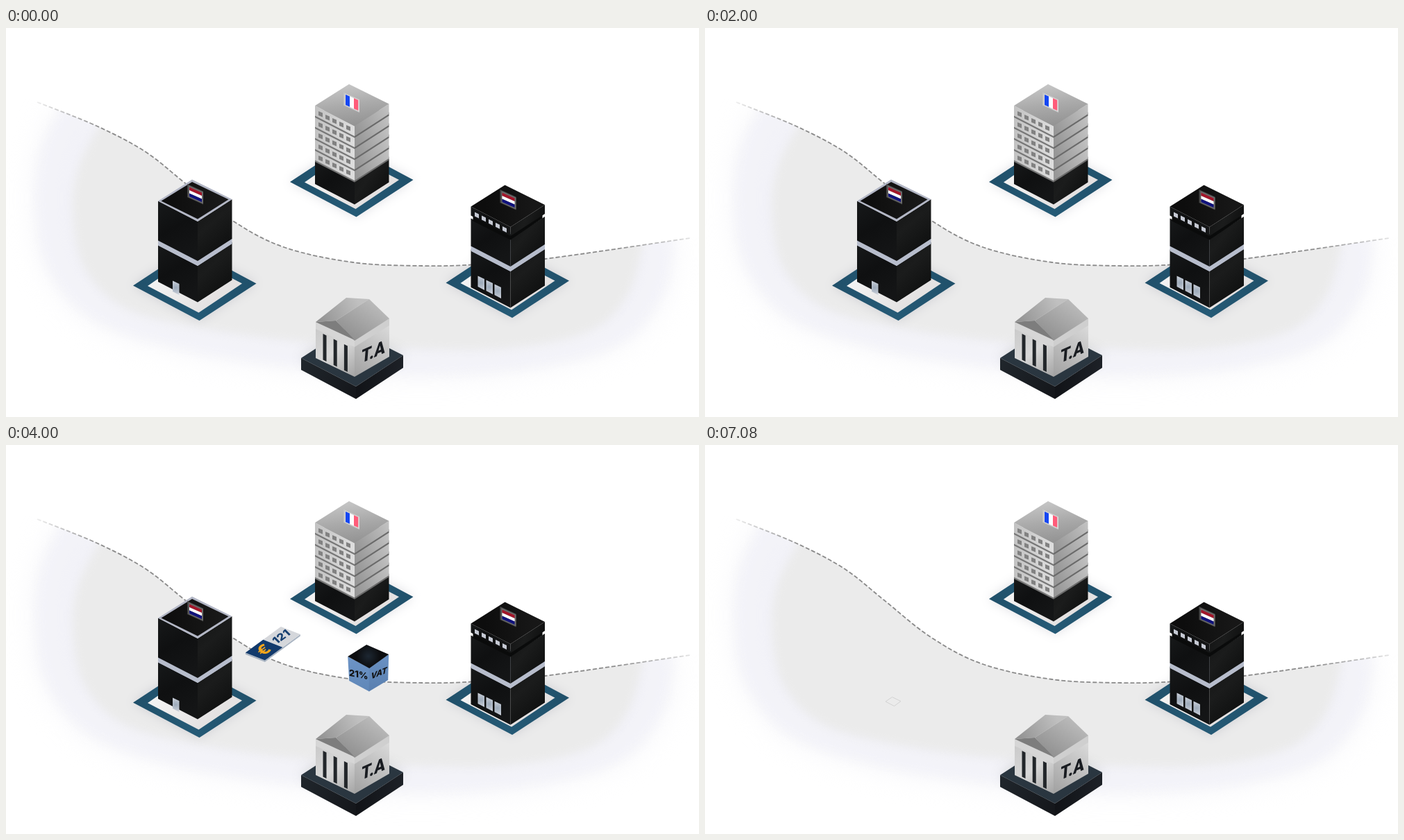
Write an HTML page with a canvas that moves like this. It is 998 px wide and 561 px high and loops after 8000 ms.

```html
<!DOCTYPE html>
<html lang="en">
<head>
<meta charset="utf-8">
<title>VAT chain transaction</title>
<style>
html, body { margin: 0; width: 100%; height: 100%; overflow: hidden; background: #fff; }
canvas { display: block; width: 998px; height: 561px; }
</style>
</head>
<body>
<canvas id="stage" width="998" height="561"></canvas>
<script>
const LOOP = 8000, W = 998, H = 561;
const stage = document.getElementById('stage').getContext('2d');
let g = stage;

const clamp = v => Math.min(1, Math.max(0, v));
const ease = v => (1 - Math.cos(Math.PI * clamp(v))) / 2;

function poly(fill, ...p) {
  g.beginPath();
  for (let i = 0; i < p.length; i += 2) g.lineTo(p[i], p[i + 1]);
  g.closePath();
  g.fillStyle = fill;
  g.fill();
}

function grad(x0, y0, x1, y1, ...colors) {
  const r = g.createLinearGradient(x0, y0, x1, y1);
  colors.forEach((c, i) => r.addColorStop(i / (colors.length - 1), c));
  return r;
}

function glow(x, y, radius, inner, outer) {
  const r = g.createRadialGradient(x, y, 0, x, y, radius);
  r.addColorStop(0, inner);
  r.addColorStop(1, outer);
  return r;
}

function at(x, y, draw, scale = 1, alpha = 1) {
  g.save();
  g.translate(x, y);
  g.scale(scale, scale);
  g.globalAlpha *= alpha;
  draw();
  g.restore();
}

function label(text, x, y, size, color, a, b, c, d) {
  g.save();
  g.transform(a, b, c, d, x, y);
  g.font = `800 ${size}px Inter, Arial, sans-serif`;
  g.textAlign = 'center';
  g.textBaseline = 'middle';
  g.fillStyle = color;
  g.fillText(text, 0, 0);
  g.restore();
}

// Smooth curve through points
function spline(pts) {
  g.moveTo(...pts[0]);
  for (let i = 0; i < pts.length - 1; i++) {
    const a = pts[Math.max(0, i - 1)], b = pts[i], c = pts[i + 1];
    const d = pts[Math.min(pts.length - 1, i + 2)];
    g.bezierCurveTo(b[0] + (c[0] - a[0]) / 6, b[1] + (c[1] - a[1]) / 6,
      c[0] - (d[0] - b[0]) / 6, c[1] - (d[1] - b[1]) / 6, c[0], c[1]);
  }
}

const border = [[45, 107], [130, 141], [200, 178], [257, 223], [325, 277], [400, 316],
  [500, 338], [600, 343], [680, 341], [776, 333], [985, 303]];
const land = [[140, 130], [103, 205], [97, 280], [115, 350], [170, 403], [270, 431],
  [420, 452], [570, 462], [720, 462], [840, 437], [895, 385], [918, 310]];
const rim = [[85, 105], [50, 180], [44, 270], [62, 350], [125, 420], [250, 462],
  [410, 488], [570, 500], [740, 492], [880, 457], [945, 385], [962, 300]];

function softArea(pts, color, blur) {
  g.filter = `blur(${blur}px)`;
  g.fillStyle = color;
  g.beginPath();
  spline(pts);
  g.lineTo(600, 200);
  g.closePath();
  g.fill();
  g.filter = 'none';
}

function ground() {
  g.save();
  g.beginPath();
  spline(border);
  g.lineTo(W, 301);
  g.lineTo(W, H);
  g.lineTo(0, H);
  g.lineTo(0, 89);
  g.closePath();
  g.clip();
  softArea(rim, '#f4f4f8', 20);
  softArea(rim, 'rgba(240,240,247,.55)', 7);
  softArea(land, '#ebebeb', 6);
  g.restore();

  g.beginPath();
  spline(border);
  g.setLineDash([6, 3]);
  g.lineWidth = 1.8;
  const line = g.createLinearGradient(45, 0, 985, 0);
  [[0, .15], [.1, 1], [.88, 1], [1, .25]].forEach(([p, a]) => line.addColorStop(p, `rgba(138,138,138,${a})`));
  g.strokeStyle = line;
  g.stroke();
  g.setLineDash([]);
}

// Plate and block coordinates are relative to the left roof corner of a tower
function plate() {
  g.save();
  g.shadowColor = 'rgba(110,110,130,.22)';
  g.shadowBlur = 16;
  poly(grad(-36, 109, 142, 109, '#20506a', '#255a76', '#20506a'), -36, 110, 59.5, 160.5, 141.5, 107, 46, 56);
  g.restore();
  poly(grad(0, 90, 60, 150, '#f4f4f4', '#e4e2e2'), -15, 110.5, 58.5, 149, 121, 107, 46, 68);
}

function block(y, h, left, right) {
  poly(left, 0, y, 57, y + 29.5, 57, y + 29.5 + h, 0, y + h);
  poly(right, 57, y + 29.5, 106.5, y - 2.5, 106.5, y - 2.5 + h, 57, y + 29.5 + h);
}

const roof = (fill, y = 0) => poly(fill, 0, y, 49, y - 31, 106.5, y - 2.5, 57, y + 29.5);

function darkBlock(y, h) {
  block(y, h, grad(0, y, 45, y + h + 20, '#17191a', '#0f1011', '#141516'),
    grad(57, y, 106, y + h, '#131414', '#1b1c1c', '#101111'));
}

function flag(x, y, frame, stripes, vertical) {
  g.save();
  g.transform(1, .45, 0, 1, x, y);
  g.fillStyle = frame;
  g.fillRect(-1, -1, 23, 19);
  g.fillStyle = vertical ? '#d9d9d9' : '#6a6a6a';
  g.fillRect(1, 0, 21, 17);
  stripes.forEach((c, i) => {
    g.fillStyle = c;
    if (vertical) g.fillRect(2 + i * 6, 1, 6.2, 15);
    else g.fillRect(2, 2 + i * 4.5, 18, 4.6);
  });
  g.restore();
}

const dutch = (x, y) => flag(x, y, '#464646', ['#a3162a', '#fff', '#10127c']);

function door(x, y, h = 16) {
  poly(glow(x + 4.5, y + h / 2 + 2, 11, '#9aa8b8', '#cfd3dc'), x, y, x + 9.5, y + 4.5, x + 9.5, y + 4.5 + h, x, y + h - .5);
}

function lowerFloors() {
  darkBlock(62, 54.5);
  roof('#b7bdcc', 64);
  block(56, 8, '#b7bdcc', '#b7bdcc');
}

function rimTower() {
  lowerFloors();
  darkBlock(0, 57);
  roof('#b2b6c5');
  poly(grad(20, 0, 90, 0, '#0e0e0e', '#191919'), 4.5, 0, 49, -27.5, 101.5, -2.2, 57, 26);
  dutch(43, -23);
  door(21, 115);
}

function windowTower() {
  lowerFloors();
  darkBlock(17, 40);
  poly('#0a0b0b', 3, 13, 57, 40, 103, 10, 103, 17, 57, 48, 3, 21);
  darkBlock(0, 13);
  roof(grad(20, 0, 90, 0, '#0d0d0d', '#171717'));
  for (let i = 0; i < 5; i++) {
    const x = 5.5 + i * 10, y = 8 + i * 5.1;
    poly('#c5c9d3', x, y, x + 6, y + 3, x + 6, y + 9, x, y + 6);
  }
  dutch(43, -23);
  for (let i = 0; i < 3; i++) door(10 + i * 12, 100 + i * 6);
}

function greyTower() {
  darkBlock(80, 33);
  roof('#101112', 80);
  for (let i = 4; i >= 0; i--) {
    const y = i * 16;
    block(y + 12, 5, '#777', '#6a6a6a');
    block(y, 14.5, grad(0, 0, 57, 0, '#c2c2c2', '#dedede'), grad(57, y + 30, 106, y, '#979797', '#c2c2c2'));
    roof(grad(57, y + 29, 49, y - 31, '#939393', '#aaa', '#c6c6c6'), y);
    for (let k = 0; k < 5; k++) {
      const x = 5 + k * 10, wy = y + 8 + k * 5;
      poly('#818181', x, wy, x + 6, wy + 2.5, x + 6, wy + 8.5, x, wy + 6);
    }
  }
  flag(42, -18, '#c4c4c4', ['#1647f2', '#fff', '#ff5c7a'], true);
}

function temple() {
  g.save();
  g.shadowColor = 'rgba(110,120,110,.25)';
  g.shadowBlur = 18;
  poly('#2a3640', 425, 476, 493, 432, 572, 472, 504, 517);
  g.restore();
  poly(grad(425, 480, 504, 535, '#20262c', '#14161a'), 425, 476, 504, 517, 504, 535, 425, 493);
  poly(grad(504, 0, 572, 0, '#111317', '#1d2127'), 504, 517, 572, 472, 572, 490, 504, 535);
  poly(grad(446, 430, 502, 503, '#c9c9c9', '#d8d8d8', '#a4a4a4'), 446, 424, 502, 449, 502, 503, 446, 476);
  poly(grad(502, 500, 552, 430, '#a2a2a2', '#dadada'), 502, 449, 552, 419, 552, 474, 502, 503);
  for (let i = 0; i < 3; i++) {
    const x = 456.5 + i * 15.2, y = 441 + i * 7.5;
    poly('#22262a', x, y, x + 5, y + 2.5, x + 5, y + 40, x, y + 37.5);
  }
  poly('#d6d6d6', 446, 424, 502, 449, 502, 460, 446, 434);
  poly('#cfcfcf', 502, 449, 552, 419, 552, 429, 502, 460);
  poly(grad(446, 424, 505, 390, '#8f8f8f', '#c0c0c0'), 446, 424, 490, 389, 523, 391, 475, 422);
  poly(grad(490, 445, 525, 391, '#909090', '#bbb'), 475, 422, 523, 391, 552, 419, 502, 451);
  poly('#7d7d7d', 446, 424, 475, 422, 502, 450);
  g.save();
  g.transform(.85, -.38, -.08, 1, 529, 468);
  g.font = '900 27px Roboto, Arial, sans-serif';
  g.textAlign = 'center';
  g.textBaseline = 'middle';
  g.fillStyle = '#191c21';
  g.fillText('T.A', 0, 0);
  g.restore();
}

function cube(rate) {
  poly(grad(0, -15, 0, 30, '#6d94c6', '#6088b9'), -29.5, -16.5, 1.5, 0, 1.5, 34, -27.5, 18.5);
  poly(grad(0, -15, 0, 30, '#6a91c3', '#5a80b0'), 1, 0, 29.5, -19.5, 28.5, 17.5, 1, 34);
  poly(glow(0, -17, 17, '#1d2732', '#0c0d0f'), -29.5, -16.5, -2.5, -33.5, 29.5, -19.5, 1.5, .5);
  label(rate, -14, 10, 13, '#111', 1, .2, 0, 1);
  label('VAT', 15.5, 8, 12.5, '#111', .9, -.37, -.18, 1);
}

function note(amount) {
  poly('#a9b4c2', -39.5, 12.5, -11.5, 23.5, 39.5, -14, 39.5, -11.5, -11.5, 26, -39.5, 15);
  poly('#d5d7db', -14, -6.2, 11.5, -25, 39.5, -14, 14, 4.8);
  poly('#123a6c', -39.5, 12.5, -14, -6.2, 14, 4.8, -11.5, 23.5);
  label('€', -12.5, 9, 25, '#f3a51b', .81, -.59, .66, .56);
  label(amount, 12.5, -10, 17, '#163f70', .81, -.59, .62, .62);
}

// Keys are [time, x, y]; Hermite interpolation with finite-difference tangents
function follow(keys, t) {
  const n = keys.length - 1;
  let i = 0;
  while (i < n - 1 && t > keys[i + 1][0]) i++;
  const a = keys[i], b = keys[i + 1], d = b[0] - a[0], u = (t - a[0]) / d;
  const slope = (k, axis) => {
    const p = keys[Math.max(0, k - 1)], q = keys[Math.min(n, k + 1)];
    return (q[axis] - p[axis]) / (q[0] - p[0]) * d;
  };
  return [1, 2].map(axis => {
    const u2 = u * u, u3 = u2 * u;
    return (2 * u3 - 3 * u2 + 1) * a[axis] + (u3 - 2 * u2 + u) * slope(i, axis)
      + (3 * u2 - 2 * u3) * b[axis] + (u3 - u2) * slope(i + 1, axis);
  });
}

const movers = [
  { draw: () => note('100'), keys: [[100, 314, 283], [920, 321, 232], [1240, 335.5, 203], [1720, 366, 193], [2000, 400, 193]] },
  { draw: () => cube('0%'), keys: [[100, 474, 191], [900, 485, 217], [1060, 488, 230], [1240, 482.5, 245], [1720, 433, 289], [2000, 380, 300]] },
  { draw: () => note('121'), keys: [[2780, 645, 315], [3200, 535, 269], [3460, 483.5, 259], [3600, 457, 260.5], [4000, 384.5, 287], [4400, 332, 312], [4800, 303, 330]] },
  { draw: () => cube('21%'), keys: [[2780, 300, 321.5], [3460, 414.5, 321.5], [4000, 521.5, 321.5], [4400, 608, 321.5], [4800, 684, 321.5]] }
];

function layer(draw) {
  const c = document.createElement('canvas');
  c.width = W;
  c.height = H;
  g = c.getContext('2d');
  draw();
  g = stage;
  return c;
}

const scenery = layer(() => {
  g.fillStyle = '#fff';
  g.fillRect(0, 0, W, H);
  ground();
  at(445, 112, () => { plate(); greyTower(); });
  at(669.5, 257.5, () => { plate(); windowTower(); });
  temple();
});

// The left tower shrinks first, then its plate
function leavingTower(t) {
  const gone = clamp((t - 6640) / 440);
  if (gone < 1) {
    at(271.5, 370, () => { g.translate(-52.5, -108.5); plate(); },
      1 - .88 * ease(gone), clamp((1 - gone) * 5));
  }
  if (gone > .9) {
    g.beginPath();
    [[260, 370], [269.5, 363.5], [282, 369.5], [272.5, 376.5]].forEach(p => g.lineTo(...p));
    g.closePath();
    g.strokeStyle = '#d2d2d2';
    g.lineWidth = 1;
    g.stroke();
  }
  const size = 1 - ease((t - 6000) / 400);
  if (size > 0) at(272, 308, () => { g.translate(-53, -58.5); rimTower(); }, size);
}

function frame() {
  const t = performance.now() % LOOP;
  g.drawImage(scenery, 0, 0);
  leavingTower(t);
  for (const { draw, keys } of movers) {
    const start = keys[0][0], end = keys[keys.length - 1][0];
    if (t <= start || t >= end) continue;
    at(...follow(keys, t), draw, 1, clamp((t - start) / 200) * clamp((end - t) / 200));
  }
  requestAnimationFrame(frame);
}
frame();
</script>
</body>
</html>
```
